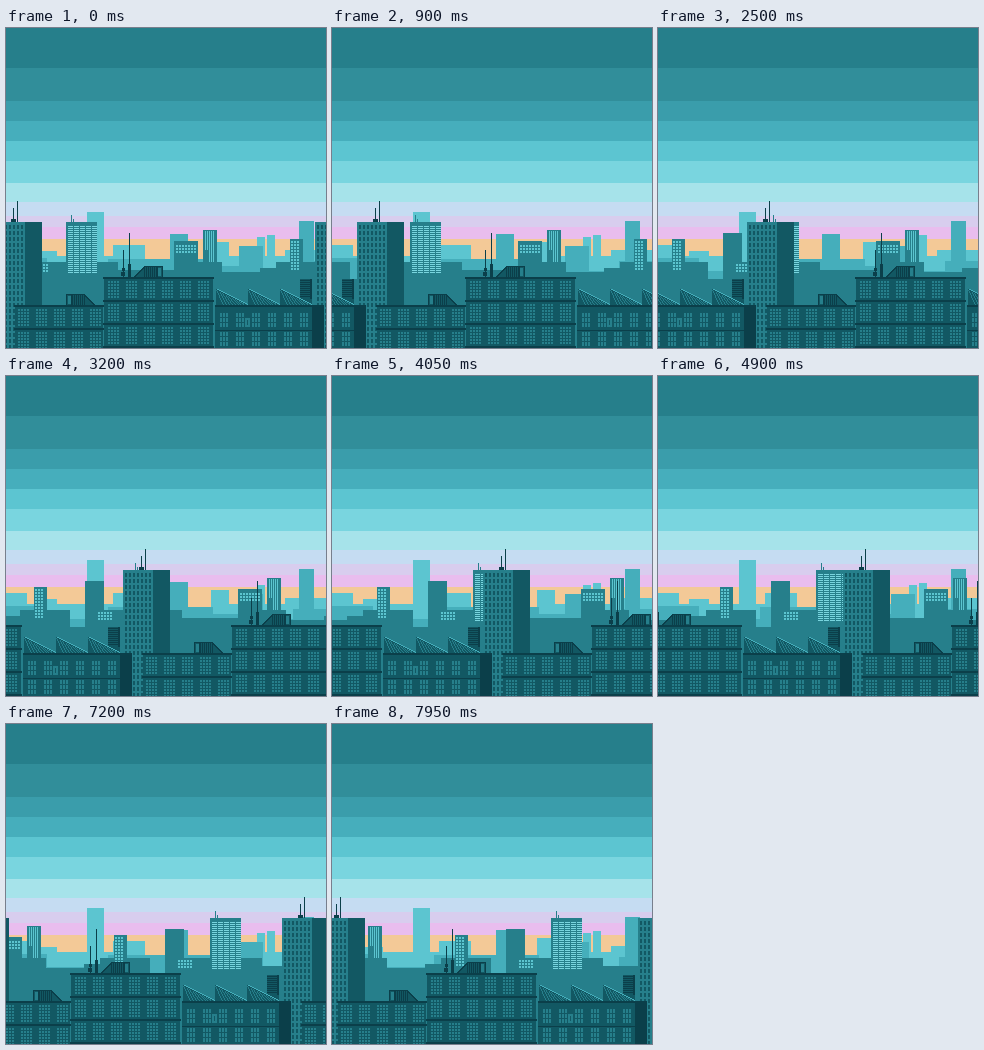
Animation, 320 px wide and 320 px high, one loop 8 s. Source, as an HTML page:

```html
<!DOCTYPE html>
<html lang="en">
<head>
<meta charset="utf-8">
<title>Skyline</title>
<style>
html, body { margin: 0; width: 100%; height: 100%; overflow: hidden; background: #267f8b; }
svg { display: block; width: 100vw; height: 100vh; }
</style>
</head>
<body>
<svg id="stage" viewBox="0 0 320 320" shape-rendering="crispEdges"></svg>
<script>
const W = 320, LOOP = 8000, STEP = 50;
const MID_SPEED = 1, FRONT_SPEED = 1.995; // pixels per step
const MID = '#267f8b', DARK = '#125863', INK = '#0b3f4a';
const LIGHT = '#5cc5d0', FAR = '#45aebb', PALE = '#79d5df';

const box = (x, y, w, h) => `M${x} ${y}h${w}v${h}h${-w}z`;
const rise = (x, top, w) => box(x, top, w, W - top);
const path = (fill, ...d) => `<path fill="${fill}" d="${d.join('')}"/>`;
const repeat = (n, draw) => Array.from({ length: n }, (_, i) => draw(i)).join('');
const grid = (x, y, cols, rows, dx, dy, w, h) =>
  repeat(rows, r => repeat(cols, c => box(x + c * dx, y + r * dy, w, h)));

function sky() {
  const bands = { 0: '#267f8b', 40: '#318e9a', 73: '#3a9dab', 93: '#46aebc', 113: '#5cc5d1',
    133: '#79d5df', 155: '#a6e3ea', 174: '#c5dcf2', 188: '#d8cdee', 199: '#e9bdee', 211: '#f3c997' };
  return Object.entries(bands).map(([top, fill]) => path(fill, rise(0, +top, W))).join('');
}

function distance() {
  return path(LIGHT, rise(0, 231, W), rise(0, 217, 21), rise(21, 228, 86), rise(31, 223, 20),
      rise(81, 184, 17), rise(107, 217, 32), rise(205, 214, 18), rise(223, 228, 97),
      rise(251, 209, 8), rise(261, 207, 8), rise(279, 222, 41)) +
    path(FAR, rise(0, 243, W), rise(0, 230, 41), rise(102, 231, 105), rise(164, 206, 18),
      rise(207, 238, 26), rise(233, 218, 24), rise(287, 233, 33), rise(293, 193, 15));
}

function midtown() {
  return path(MID, rise(0, 251, W), rise(15, 205, 19), rise(34, 234, 78), rise(60, 194, 31),
      rise(112, 242, 56), rise(168, 213, 24), rise(192, 234, 24), rise(197, 202, 14),
      rise(216, 244, 38), rise(254, 240, 16), rise(270, 234, 50), rise(284, 211, 13),
      box(65, 187, 1, 7), box(67, 191, 1, 3)) +
    path(PALE, grid(62, 198, 5, 24, 6, 2, 5, 1)) +
    path(LIGHT, grid(28, 236, 5, 3, 3, 3, 2, 2),
      grid(170, 217, 7, 3, 3, 3, 2, 2),
      grid(199, 203, 2, 1, 2, 1, 1, 19), grid(203, 203, 3, 1, 2, 1, 1, 31),
      grid(285, 213, 3, 10, 3, 3, 2, 2));
}

const tower = () =>
  path(MID, rise(-11, 194, 30)) +
  path(DARK, rise(19, 194, 17), grid(-9, 197, 7, 21, 4, 6, 2, 4)) +
  path(INK, box(11, 173, 1, 21), box(7, 180, 1, 14), box(5, 191, 5, 3));

// Brick block with a ledge and a row of lattice windows on each floor.
function block(x, y, w, groups, first) {
  const floors = Math.ceil((W - y) / 23);
  const panes = repeat(floors, f => repeat(groups, g =>
    grid(first + g * 18, y + 4 + f * 23, 4, 6, 3, 3, 2, 2)));
  return path(DARK, rise(x, y, w)) + path(MID, panes) +
    path(INK, grid(x - 1, y, 1, floors, 1, 23, w + 2, 2));
}

function skylight(x, y, flip) {
  const place = flip ? `translate(${x + 29} ${y}) scale(-1 1)` : `translate(${x} ${y})`;
  return `<g transform="${place}">` + path(DARK, 'M0 11L10 0H29V11z') +
    path(INK, 'M0 11L10 0H29V1H11L2 11z', grid(10, 1, 6, 1, 2, 1, 1, 10),
      box(22, 1, 2, 10), box(28, 0, 1, 11)) +
    path(MID, box(24, 2, 3, 8)) + '</g>';
}

const masts = () => path(INK, box(123, 205, 1, 44), box(122, 236, 3, 13),
  box(117, 222, 1, 27), box(116, 240, 3, 3), box(115, 244, 4, 4));

// Workshop under three saw teeth, each dropping 16 over a width of 32.
function factory() {
  const teeth = draw => repeat(3, i => draw(210 + i * 32));
  const seam = (x, k) => `M${x + k * 3} ${262 + k * 1.5}h1L${x + k * 3 + 8} 277h-1z`;
  return path(DARK, box(294, 251, 12, 26)) +
    path(INK, grid(294, 252, 1, 9, 1, 2, 12, 1), box(304, 251, 2, 20)) +
    path(DARK, teeth(x => `M${x} 278V261L${x + 32} 277V278z`), rise(209, 277, 97)) +
    path(MID, teeth(x => repeat(9, k => seam(x, k)))) +
    path(FAR, teeth(x => `M${x} 261h2L${x + 32} 276v1z`)) +
    path(INK, rise(306, 277, 12), box(209, 277, 109, 2), box(209, 302, 97, 1)) +
    path(MID, repeat(2, f => repeat(6, g =>
      grid(214 + g * 16, 285 + f * 19, 3, 3, 3, 5, 2, 4)))) +
    path(DARK, box(238, 289, 7, 11)) +
    path(MID, box(239, 290, 5, 9)) + path(DARK, box(241, 292, 1, 5));
}

const street = () => tower() + skylight(60, 266, true) + block(9, 277, 88, 5, 12) +
  masts() + skylight(128, 238, false) + block(98, 249, 109, 6, 102) + factory();

// Repeats a layer so that it wraps; tiles further left overlap those to the right.
const layer = (id, art) => `<defs><g id="${id}Art">${art}</g></defs><g id="${id}">` +
  [W, 0, -W].map(x => `<use href="#${id}Art" x="${x}"/>`).join('') + '</g>';

document.getElementById('stage').innerHTML =
  sky() + distance() + layer('mid', midtown()) + layer('front', street());
const mid = document.getElementById('mid');
const front = document.getElementById('front');

function slide(el, px) {
  el.setAttribute('transform', `translate(${Math.round(px) % W} 0)`);
}

function draw(ms) {
  const n = Math.floor((ms % LOOP) / STEP);
  slide(mid, n * MID_SPEED);
  slide(front, n * FRONT_SPEED);
}

const start = performance.now();
function tick() {
  draw(performance.now() - start);
  requestAnimationFrame(tick);
}
draw(0);
requestAnimationFrame(tick);
</script>
</body>
</html>
```
